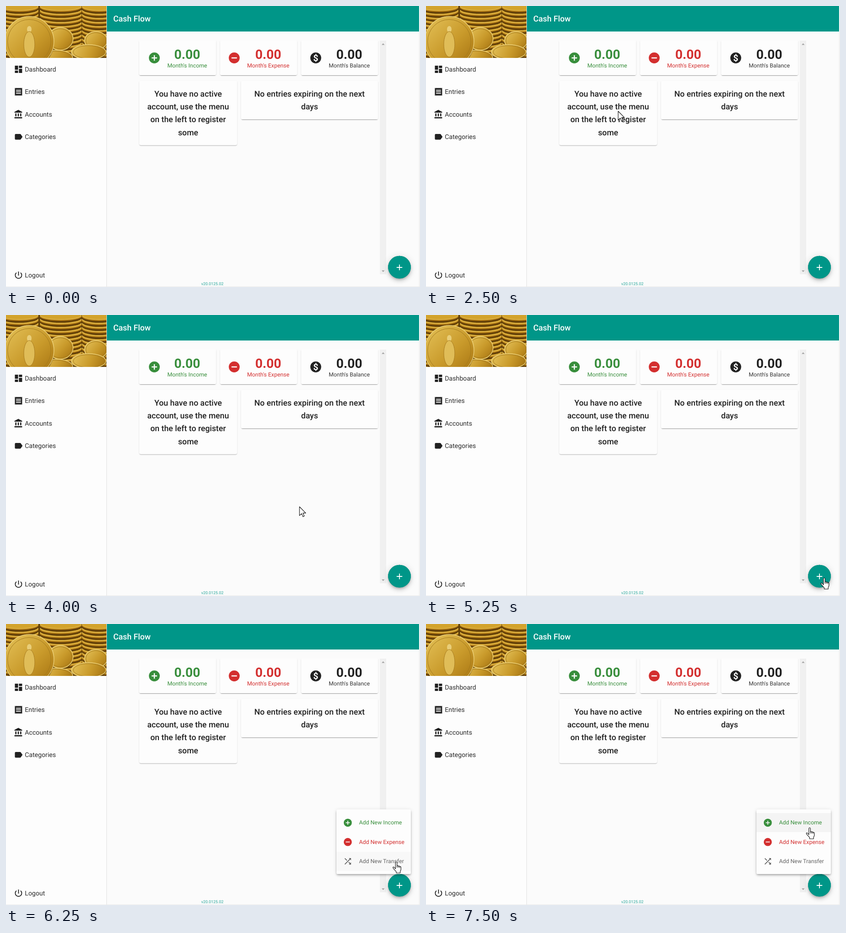
Animation, 907 px wide and 617 px high, one loop 8 s. Source, as an HTML page with a canvas:

```html
<!DOCTYPE html>
<html lang="en">
<head>
<meta charset="utf-8">
<title>Cash Flow</title>
<style>
  html, body { margin: 0; width: 100%; height: 100%; overflow: hidden; background: #fafafa; }
  canvas { display: block; width: 907px; height: 617px; }
</style>
</head>
<body>
<canvas id="stage" width="907" height="617"></canvas>
<script>
const ctx = document.getElementById('stage').getContext('2d');
const LOOP = 8000;
const UNIT = 0.885;
const TEAL = '#009688', GREEN = '#388e3c', RED = '#d32f2f', INK = '#212121';

const DISC = 'M12 2a10 10 0 1 0 0 20a10 10 0 1 0 0-20z';
const icons = {
  dashboard: 'M3 13h8V3H3zm0 8h8v-6H3zm10 0h8V11h-8zm0-18v6h8V3z',
  receipt: 'M3 22' + 'l1.5-1.5l1.5 1.5'.repeat(6) + 'V2' + 'l-1.5 1.5l-1.5-1.5'.repeat(6) +
    'zM18 17H6v-2h12zm0-4H6v-2h12zm0-4H6V7h12z',
  bank: 'M4 10v7h3v-7zm6 0v7h3v-7zM2 22h19v-3H2zm14-12v7h3v-7zm-4.5-9L2 6v2h19V6z',
  label: 'M17.6 5.8Q17 5 16 5H5Q3 5 3 7v10q0 2 2 2h11q1 0 1.6-.8L22 12z',
  power: 'M13 3h-2v10h2zm4.8 2.2l-1.4 1.4A7 7 0 1 1 7.6 6.6L6.2 5.2a9 9 0 1 0 11.6 0z',
  add: 'M19 13h-6v6h-2v-6H5v-2h6V5h2v6h6z',
  plus: DISC + 'M17 13h-4v4h-2v-4H7v-2h4V7h2v4h4z',
  minus: DISC + 'M17 13H7v-2h10z',
  disc: DISC,
  shuffle: 'M10.6 9.2L5.4 4 4 5.4l5.2 5.2zM14.5 4l2 2L4 18.6 5.4 20 18 7.5l2 2V4z' +
    'm.3 9.4l-1.4 1.4 3.1 3.1-2 2.1H20v-5.5l-2 2z',
  arrow: 'M0 0V17L4 13.2 6.6 19.2 9.2 18 6.7 12.2H12z',
  hand: 'M5.5 14V2.2q0-1.7 1.5-1.7t1.5 1.7V8q1.5-1 2.5.8 1.5-.8 2.6.7 2.4-.4 2.4 1.7V15' +
    'q0 1.5-1.5 4v3H7v-2.5L2 14q-2.3-3-.8-3.6 1.6-.4 4.3 3.6z',
  knuckles: 'M8.5 8v3.5M11 8.8v3M13.6 9.5v2.6',
  beam: 'M-3 0.5h2.5l.5.6.5-.6H3M0 1v13M-3 14.5h2.5l.5-.6.5.6H3'
};
for (const name in icons) icons[name] = new Path2D(icons[name]);

// [start ms, shape, x, y]: the pointer is sampled four times a second
const pointer = [
  [0, ''], [750, 'arrow', 817, 323], [1000, 'arrow', 740, 308], [1250, 'arrow', 645, 287],
  [1500, 'arrow', 555, 264], [1750, 'beam', 482, 246], [2000, 'arrow', 420, 197],
  [2250, 'arrow', 347, 183], [2500, 'arrow', 421, 231], [2750, 'arrow', 440, 235],
  [3000, 'arrow', 418, 235], [3250, 'arrow', 448, 227], [3750, 'arrow', 535, 310],
  [4000, 'arrow', 643, 421], [4250, 'arrow', 765, 525], [4500, 'hand', 870, 584],
  [4750, 'hand', 862, 577], [5000, 'hand', 880, 567], [5250, 'hand', 872.5, 577],
  [5750, 'arrow', 863.5, 577], [6000, 'arrow', 862, 567], [6250, 'hand', 855, 522],
  [6500, 'hand', 846, 480], [6750, 'hand', 840.5, 451], [7000, 'hand', 840.5, 447]
];

function box(x, y, w, h, color) {
  ctx.fillStyle = color;
  ctx.fillRect(x, y, w, h);
}

function ellipse(x, y, rx, ry, fill, stroke, width = 1) {
  ctx.beginPath();
  ctx.ellipse(x, y, rx, ry, 0, 0, Math.PI * 2);
  if (fill) { ctx.fillStyle = fill; ctx.fill(); }
  if (stroke) { ctx.strokeStyle = stroke; ctx.lineWidth = width; ctx.stroke(); }
}

function text(str, x, y, size, color, weight = 400, align = 'left') {
  ctx.font = `${weight} ${size}px Roboto, sans-serif`;
  ctx.textAlign = align;
  ctx.fillStyle = color;
  ctx.fillText(str, x, y);
}

function icon(name, x, y, color, scale = UNIT) {
  ctx.save();
  ctx.translate(x, y);
  ctx.scale(scale, scale);
  ctx.translate(-12, -12);
  ctx.fillStyle = color;
  ctx.fill(icons[name], 'evenodd');
  ctx.restore();
}

// layers: [offset, blur, spread, alpha]
function raised(x, y, w, h, r, color, layers) {
  ctx.save();
  for (const [dy, blur, spread, alpha] of [...layers, [0, 0, 0, 0]]) {
    ctx.shadowColor = `rgba(0,0,0,${alpha})`;
    ctx.shadowOffsetY = dy;
    ctx.shadowBlur = blur;
    ctx.fillStyle = color;
    ctx.beginPath();
    ctx.roundRect(x - spread, y - spread, w + 2 * spread, h + 2 * spread, r + spread);
    ctx.fill();
  }
  ctx.restore();
}

const card = (x, y, w, h) => raised(x, y, w, h, 3.5, '#fdfdfd',
  [[1.8, 0.9, -0.9, 0.2], [0.9, 0.9, 0, 0.14], [0.9, 2.7, 0, 0.12]]);

function coinStack(x, rx, top, tilt) {
  for (let y = 118; y >= top; y -= 9) {
    const cx = x + tilt * Math.sin(y * 0.7);
    ellipse(cx, y + 5, rx, 11, '#63400a');
    ellipse(cx, y + 2, rx, 10, '#b57d15');
    ellipse(cx, y, rx - 1, 9, '#d3a32c', '#edcb62');
  }
}

function coin(x, y, rx, ry) {
  const gold = ctx.createLinearGradient(x - rx, y - ry, x + rx, y + ry);
  gold.addColorStop(0, '#e5c35a');
  gold.addColorStop(0.55, '#c99a2b');
  gold.addColorStop(1, '#a4710f');
  ellipse(x, y + 3, rx, ry, '#654408');
  ellipse(x, y, rx, ry, gold, '#ecd078', 1.5);
  ellipse(x, y, rx * 0.88, ry * 0.88, null, '#a47a1d');
}

function coins() {
  ctx.save();
  ctx.beginPath();
  ctx.rect(0, 0, 220, 114);
  ctx.clip();
  box(0, 0, 220, 114, '#604008');
  coinStack(28, 42, -6, 2);
  coinStack(202, 38, -6, 3);
  coinStack(118, 46, -4, 3);
  coin(197, 76, 25, 20);
  coin(119, 72, 28, 25);
  coin(181, 101, 38, 16);
  coin(110, 113, 36, 16);
  coin(51, 78, 54, 55);
  ellipse(51, 51, 5, 7, '#e9ce79');
  ellipse(51, 84, 12, 28, '#e0bd58', '#a97d20');
  ctx.restore();
}

function sidebar() {
  box(0, 0, 220, 616, '#fdfdfd');
  box(220, 0, 1, 616, '#e0e0e0');
  coins();
  const items = [['dashboard', 'Dashboard', 139], ['receipt', 'Entries', 188.3],
    ['bank', 'Accounts', 237.8], ['label', 'Categories', 287.3], ['power', 'Logout', 591]];
  for (const [name, label, y] of items) {
    icon(name, 27.4, y, INK);
    text(label, 41.3, Math.round(y + 5), 14.16, '#2b2b2b');
  }
}

function total(cx, iconX, name, color, label, labelColor = color) {
  card(cx - 105.3, 75, 168.5, 77);
  icon(name, iconX, 114, color, 1.19);
  if (name === 'disc') text('$', iconX, 121, 19.5, '#fdfdfd', 700, 'center');
  text('0.00', cx, 116, 28.3, color, 700, 'center');
  text(label, cx, 135, 12.39, labelColor, 400, 'center');
}

function message(lines, cx) {
  lines.forEach((line, i) => text(line, cx, Math.round(198.6 + i * 28.3), 17.7, INK, 500, 'center'));
}

function scrollbar() {
  box(819, 76, 14.5, 513, '#f0f0f0');
  ctx.fillStyle = '#a0a0a0';
  for (const [y, dir] of [[84, -1], [582, 1]]) {
    ctx.beginPath();
    ctx.moveTo(823, y - 1.5 * dir);
    ctx.lineTo(829.5, y - 1.5 * dir);
    ctx.lineTo(826.25, y + 2 * dir);
    ctx.fill();
  }
}

function dashboard() {
  box(221, 0, 684, 616, '#fbfbfb');
  ctx.save();
  ctx.beginPath();
  ctx.rect(285, 76, 548, 513);
  ctx.clip();
  total(397, 325, 'plus', GREEN, "Month's Income");
  total(574.5, 500, 'minus', RED, "Month's Expense");
  total(752, 678.6, 'disc', INK, "Month's Balance", '#383838');
  card(292, 164, 214.3, 141.5);
  card(515, 164, 300, 85);
  message(['You have no active', 'account, use the menu', 'on the left to register', 'some'], 399);
  message(['No entries expiring on the next', 'days'], 665);
  scrollbar();
  ctx.restore();
  text('v20.0125.02', 452, 613, 8.85, '#26a69a', 400, 'center');
  box(221, 0, 684, 56, TEAL);
  text('Cash Flow', 235, 34, 17.7, '#fff', 500);
}

function addButton(pressed) {
  raised(837.2, 548.7, 49.6, 49.6, 24.8, pressed ? '#1a9f91' : TEAL,
    [[2.7, 4.4, -0.9, 0.2], [5.3, 8.8, 0, 0.14], [0.9, 16, 0, 0.12]]);
  icon('add', 862, 574, '#fff');
}

function menu(t) {
  raised(724, 407.3, 163, 141.7, 3.5, '#fdfdfd',
    [[1.8, 3.5, -0.9, 0.2], [3.5, 4.4, 0, 0.14], [0.9, 8.8, 0, 0.12]]);
  const hovered = t >= 6750 ? 0 : t >= 6500 ? 1 : t >= 6250 ? 2 : -1;
  if (hovered >= 0) box(724, 415 + hovered * 42.5, 163, 42, t < 7500 ? '#f8f8f8' : '#f4f4f4');
  const rows = [['plus', 'Income', GREEN], ['minus', 'Expense', RED], ['shuffle', 'Transfer', '#656565']];
  rows.forEach(([name, label, color], i) => {
    const y = 436.3 + i * 42.4;
    icon(name, 748.8, y, color);
    text('Add New ' + label, 773.4, Math.round(y + 4), 12.39, color);
  });
}

function drawPointer(t) {
  const [, shape, x, y] = pointer.findLast(step => step[0] <= t);
  if (!shape) return;
  ctx.save();
  ctx.translate(x, y);
  ctx.lineWidth = 1;
  ctx.lineJoin = 'round';
  ctx.strokeStyle = '#111';
  ctx.fillStyle = '#fff';
  if (shape !== 'beam') ctx.scale(1.14, 1.14);
  if (shape === 'hand') ctx.translate(-7, -0.3);
  if (shape !== 'beam') ctx.fill(icons[shape]);
  ctx.stroke(icons[shape]);
  if (shape === 'hand') ctx.stroke(icons.knuckles);
  ctx.restore();
}

function render(t) {
  box(0, 0, 907, 617, '#fafafa');
  sidebar();
  dashboard();
  box(905, 56, 1, 560, '#e6e6e6');
  box(0, 616, 907, 1, '#e9e9e9');
  addButton(t >= 5750 && t < 6250);
  if (t >= 5750) menu(t);
  drawPointer(t);
}

ctx.textRendering = 'geometricPrecision';
const start = performance.now();
function frame() {
  render((performance.now() - start) % LOOP);
  requestAnimationFrame(frame);
}
frame();
</script>
</body>
</html>
```
